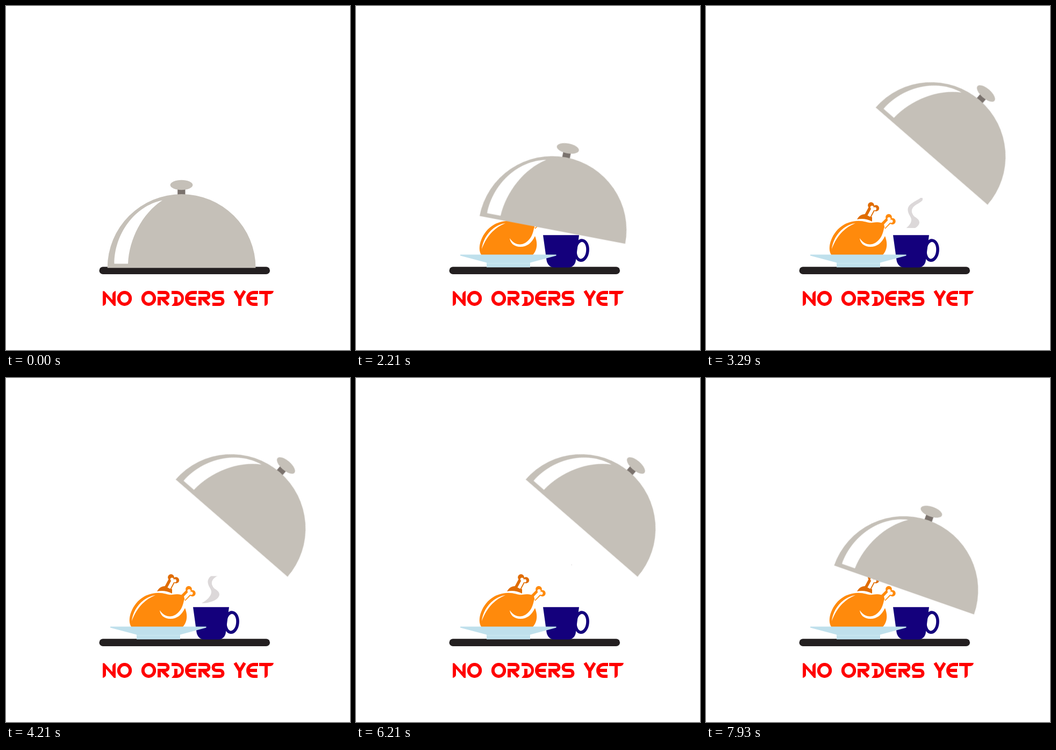
An HTML page for the animation above (8 s loop, 640x640 px).

```html
<!DOCTYPE html>
<html lang="en">
<head>
<meta charset="utf-8">
<title>No orders yet</title>
<style>
  html, body { margin: 0; width: 100%; height: 100%; overflow: hidden; background: #fff; }
  svg { display: block; width: 100%; height: 100%; }

  .lift, .tilt, .puffs { animation: 8s linear infinite; }
  .lift { animation-name: lift; }
  .tilt { animation-name: tilt; transform-origin: 326.5px 405.5px; }
  .puffs { animation-name: rise; }

  /* The loop cuts off while the lid is on its way down. */
  @keyframes lift {
    0% { transform: translate(0, 0); }
    15.75% { transform: translate(0, 0); animation-timing-function: cubic-bezier(.535, 0, .83, 1); }
    37.5% { transform: translate(146.8px, -188px); }
    93.09% { transform: translate(146.8px, -188px); animation-timing-function: cubic-bezier(.333, 0, .667, .552); }
    100% { transform: translate(52.8px, -67.7px); }
  }
  @keyframes tilt {
    0% { transform: rotate(0deg); }
    18.75% { transform: rotate(0deg); animation-timing-function: cubic-bezier(.55, 0, .85, 1); }
    37.5% { transform: rotate(41deg); }
    93.09% { transform: rotate(41deg); animation-timing-function: cubic-bezier(.333, 0, .667, .552); }
    100% { transform: rotate(14.8deg); }
  }
  @keyframes rise {
    0%, 31.5625% { transform: translateY(0); }
    78%, 100% { transform: translateY(-301px); }
  }

  .lettering { fill: none; stroke: #f00; stroke-width: 6; stroke-linejoin: round; }
  .solid { fill: #f00; stroke: none; }
  .label { font: 700 34px "DejaVu Sans", sans-serif; fill: transparent; }
</style>
</head>
<body>
<svg viewBox="0 0 640 640">
  <defs>
    <clipPath id="puffs">
      <path class="puffs" d="M355 419h60v56h-60z M355 505h60v56h-60z M355 591h60v56h-60z"/>
    </clipPath>
    <path id="e" d="M22 3H14a11 11 0 0 0 0 22H21M5 14H20"/>
    <path id="o" d="M2.8 14a10.7 11 0 1 0 21.4 0a10.7 11 0 1 0 -21.4 0"/>
    <path id="r" d="M0 3H14a5.5 5.5 0 0 1 0 11H8L20 26M3 11V27"/>
  </defs>

  <rect x="173.5" y="485.3" width="317.5" height="13.8" rx="6.9" fill="#231f20"/>

  <!-- cup -->
  <g fill="#14007c">
    <path d="M348 426.3H415L409 473C408 481 403 486.5 395 486.5H369C361 486.5 356 481 354.5 473Z"/>
    <ellipse cx="419.5" cy="454.7" rx="11.5" ry="18.6" fill="none" stroke="#14007c" stroke-width="5.6" transform="rotate(5 419.5 454.7)"/>
  </g>
  <path clip-path="url(#puffs)" fill="#dcd8d9"
    d="M364 419C373 414 382 406 382 398C382 392 376 388 375.5 380C375 369 387 365 398 358C400 355 400 351 400.5 347H402C402 352 403 356 403 361C400 366 389 369 385 375C381 381 383 386 387 391C391 394 397 397 397 403C396 413 379 419 364 419Z"/>

  <!-- back leg -->
  <g fill="#e06c00">
    <path d="M281 397C286 388 294 385 302 389L309 393V401C300 396 290 395 281 397Z"/>
    <path d="M301 391L309.5 375" stroke="#e06c00" stroke-width="13"/>
    <circle cx="307" cy="370.8" r="5.9"/>
    <circle cx="316.2" cy="376.2" r="5.9"/>
  </g>
  <g fill="#fff">
    <path d="M303 391L310.5 377" stroke="#fff" stroke-width="5.8"/>
    <circle cx="308.8" cy="374.5" r="3"/>
    <circle cx="314" cy="377.3" r="3"/>
  </g>

  <!-- front leg and body -->
  <g fill="#ff8a0c">
    <path d="M328 411L341 398" stroke="#ff8a0c" stroke-width="13"/>
    <circle cx="340" cy="392.8" r="5.9"/>
    <circle cx="346.8" cy="400.5" r="5.9"/>
  </g>
  <g fill="#fff">
    <path d="M328 414L342 399" stroke="#fff" stroke-width="6"/>
    <circle cx="340.5" cy="396" r="3"/>
    <circle cx="344.5" cy="400.5" r="3"/>
  </g>
  <path fill="#ff8a0c" d="M234 464C228 457 229 445 233 435C241 414 260 400 283 399.7C296 399.5 302 404.5 310 403C319 401.5 326 402 331 406L332.5 413L333 428C338 440 338 454 328 464Z"/>
  <g fill="#fff">
    <path d="M286 432C293 443 305 447 316 440C326 433 329 424 331.5 412L340 424L333 428C327 441 318 448 306 448C294 448 287 441 286 432Z"/>
    <path d="M234 452C236 431 253 408 278 404C256 413 242 430 234 452Z"/>
  </g>

  <!-- plate -->
  <path fill="#bfe0ec" d="M194 462.5H372.5V464.5L324 477.5V486.3H243V477.5L194 464.5Z"/>
  <path d="M243 478.8H324" stroke="#cfe9f2"/>

  <!-- lid -->
  <g class="lift"><g class="tilt">
    <rect x="319.2" y="340" width="14.3" height="12" fill="#7a726d"/>
    <g fill="#c5c0b8">
      <ellipse cx="326.5" cy="333" rx="20.9" ry="9.2"/>
      <path d="M188.7 487.3A137.9 137.3 0 0 1 464.5 487.3Z"/>
    </g>
    <path fill="#fff" d="M201.5 479.5C201.5 425 239 372 291 361.5C253 386 229 434 227 479.5Z"/>
  </g></g>

  <g class="lettering" aria-hidden="true">
    <path class="solid" d="M180 558V530.5H183L198 547V537Q198 532 204 530V558H201L186 541V552Q186 556 180 558Z"/>
    <use href="#o" x="207" y="530"/>
    <use href="#o" x="252" y="530"/>
    <use href="#r" x="282" y="530"/>
    <path class="solid" d="M308 530H317a14 14 0 0 1 0 28H308L313 552V541H319V552a8 8 0 0 0 -2-16H308Z"/>
    <use href="#e" x="333" y="530"/>
    <use href="#r" x="358" y="530"/>
    <path d="M405 533H391a5.5 5.5 0 0 0 0 11H398a5.5 5.5 0 0 1 0 11H384"/>
    <path d="M426 530L435 545L444 530M435 543V558"/>
    <use href="#e" x="447" y="530"/>
    <path class="solid" d="M471 530H498Q497 536 491 536H487V552Q487 557 481 558V536H471Z"/>
  </g>
  <!-- selectable copy of the drawn lettering -->
  <text class="label" x="180" y="557">NO ORDERS YET</text>
</svg>
</body>
</html>
```
